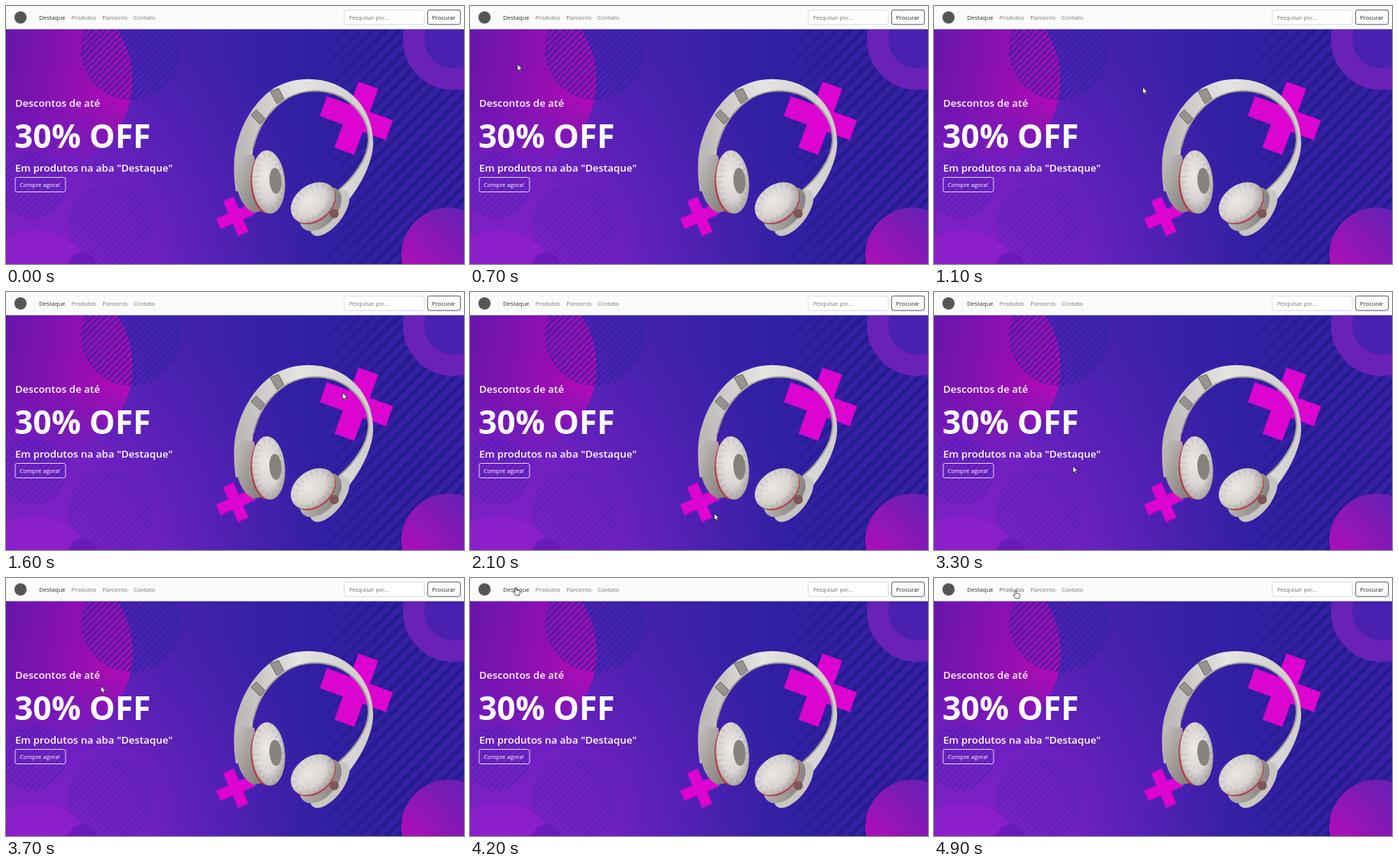
Write an HTML page that moves like this. It is 600 px wide and 338 px high and loops after 5000 ms.

```html
<!DOCTYPE html>
<html lang="pt">
<head>
<meta charset="utf-8">
<style>
html, body { margin: 0; width: 100%; height: 100%; overflow: hidden; }
svg { display: block; width: 100%; height: 100%; }
text { font-family: "Open Sans", "Noto Sans", sans-serif; font-size: 7.65px; }
.link { fill: #777; }
.link.on { fill: #2c2c2c; }
.head { font-weight: 600; font-size: 13.4px; }
</style>
</head>
<body>
<svg viewBox="0 0 600 338">
  <defs>
    <linearGradient id="bg">
      <stop offset="0" stop-color="#6a1fc0"/>
      <stop offset=".35" stop-color="#4321ae"/>
      <stop offset=".65" stop-color="#3120a3"/>
      <stop offset="1" stop-color="#3a1fa6"/>
    </linearGradient>
    <radialGradient id="glow" gradientUnits="userSpaceOnUse" cx="60" cy="350" r="370">
      <stop offset="0" stop-color="#8420c8"/>
      <stop offset=".35" stop-color="#7820c4" stop-opacity=".8"/>
      <stop offset="1" stop-color="#5a20b4" stop-opacity="0"/>
    </radialGradient>
    <linearGradient id="disc" x1=".25" y1=".4" x2="1" y2=".55">
      <stop offset="0" stop-color="#6416ac"/>
      <stop offset=".5" stop-color="#8a10b2"/>
      <stop offset="1" stop-color="#b60ab2"/>
    </linearGradient>
    <linearGradient id="discFade" x1="0" y1="0" x2="0" y2="1">
      <stop offset=".6" stop-color="#fff"/>
      <stop offset="1" stop-color="#000"/>
    </linearGradient>
    <mask id="fade"><circle cx="46" cy="97" r="120" fill="url(#discFade)"/></mask>
    <linearGradient id="corner" x1="0" y1=".75" x2=".65" y2=".15">
      <stop offset="0" stop-color="#b60cb8"/>
      <stop offset="1" stop-color="#6c1fb4"/>
    </linearGradient>
    <linearGradient id="band" x1="0" y1=".5" x2="1" y2=".4">
      <stop offset="0" stop-color="#b9b5b3"/>
      <stop offset=".5" stop-color="#e6e4e3"/>
      <stop offset="1" stop-color="#cfccca"/>
    </linearGradient>
    <radialGradient id="pad" cx=".45" cy=".4" r=".65">
      <stop offset="0" stop-color="#ebe8e6"/>
      <stop offset=".6" stop-color="#d8d4d2"/>
      <stop offset="1" stop-color="#a39e9d"/>
    </radialGradient>
    <linearGradient id="shell" x1="0" y1="0" x2="1" y2="1">
      <stop offset="0" stop-color="#c4c0be"/>
      <stop offset="1" stop-color="#7d7877"/>
    </linearGradient>
    <pattern id="fine" width="6" height="6" patternUnits="userSpaceOnUse" patternTransform="rotate(-45)">
      <rect width="6" height="2.8" fill="#2c22a2"/>
    </pattern>
    <pattern id="wide" width="12" height="12" patternUnits="userSpaceOnUse" patternTransform="rotate(-45)">
      <rect width="12" height="5.5" fill="#201c8a"/>
    </pattern>
    <linearGradient id="wideFade">
      <stop offset="0" stop-color="#000"/>
      <stop offset=".6" stop-color="#ddd"/>
    </linearGradient>
    <mask id="wideMask"><rect x="380" y="30" width="220" height="308" fill="url(#wideFade)"/></mask>
    <path id="cross" d="M-13.8-46h27.6v32.2h32.2v27.6h-32.2v32.2h-27.6v-32.2h-32.2v-27.6h32.2z" fill="#dc04d0"/>
  </defs>

  <rect width="600" height="338" fill="url(#bg)"/>
  <rect width="600" height="338" fill="url(#glow)"/>
  <circle cx="46" cy="97" r="120" fill="url(#disc)" mask="url(#fade)"/>
  <circle cx="163" cy="58" r="65" fill="url(#fine)" opacity=".75"/>
  <circle cx="35" cy="235" r="44" fill="url(#fine)" opacity=".35"/>
  <circle cx="137" cy="290" r="57" fill="url(#fine)" opacity=".25"/>
  <circle cx="38" cy="375" r="81" fill="#8f1fcc" opacity=".75"/>
  <circle cx="100" cy="342" r="19" fill="#651bb8" opacity=".8"/>
  <rect x="380" y="30" width="220" height="308" fill="url(#wide)" mask="url(#wideMask)"/>
  <circle cx="586" cy="44" r="52" fill="#4a20b0" stroke="#6a21b8" stroke-width="28"/>
  <circle cx="580" cy="326" r="62" fill="url(#corner)"/>
  <use href="#cross" transform="translate(459 147) rotate(20)"/>
  <use href="#cross" transform="translate(301 275.6) rotate(-23) scale(.54)"/>

  <!-- headphones -->
  <path fill="url(#band)" d="M301 243C297 215 298 190 305 172C315 140 335 118 352 107C375 94 405 92 430 102C462 115 481 145 481 180C481 205 462 242 440 264L424 270L436 241C455 225 474 200 475 176C476 148 455 124 430 115C405 107 380 112 362 125C342 140 330 160 324 185L318 240Z"/>
  <path fill="none" stroke="#a19c9b" stroke-width="2" d="M324 185C330 160 342 140 362 125C380 112 405 107 430 115C455 124 476 148 475 176C474 200 455 225 436 241"/>
  <path fill="#99938f" stroke="#6b6664" d="M346 112l11-4 7 13-9 7zM321 143l7-7 11 11-6 8z"/>
  <path fill="url(#shell)" d="M302 193C297 222 302 262 325 271L337 268L325 196Z"/>
  <ellipse cx="341.5" cy="231" rx="21" ry="41" fill="#b6404a" transform="rotate(-2 341.5 231)"/>
  <ellipse cx="344" cy="230.5" rx="21.5" ry="41.5" fill="url(#pad)" transform="rotate(-4 344 230.5)"/>
  <ellipse cx="353" cy="229" rx="8" ry="17" fill="#88827f" transform="rotate(-4 353 229)"/>
  <ellipse cx="424" cy="271" rx="36" ry="17" fill="#c9c5c3" transform="rotate(-52 424 271)"/>
  <ellipse cx="412" cy="266" rx="34" ry="21" fill="url(#shell)" transform="rotate(-48 412 266)"/>
  <ellipse cx="403.5" cy="259" rx="32" ry="23" fill="#b6404a" transform="rotate(-40 403.5 259)"/>
  <ellipse cx="402" cy="257.5" rx="32" ry="23" fill="url(#pad)" transform="rotate(-38 402 257.5)"/>
  <g fill="none" stroke="#8d8886" stroke-width="8" stroke-dasharray=".8 7" opacity=".45">
    <ellipse cx="344" cy="230.5" rx="17" ry="36" transform="rotate(-4 344 230.5)"/>
    <ellipse cx="402" cy="257.5" rx="27" ry="18" transform="rotate(-38 402 257.5)"/>
  </g>
  <circle cx="430" cy="272" r="6" fill="#7d5557"/>

  <g fill="#fff">
    <text class="head" x="12" y="132">Descontos de até</text>
    <text x="11" y="186" style="font-size:42.6px;font-weight:700">30% OFF</text>
    <text class="head" x="12" y="217">Em produtos na aba "Destaque"</text>
    <text x="18" y="237">Compre agora!</text>
  </g>
  <rect x="12" y="224.5" width="66" height="19" rx="2.5" fill="none" stroke="#fff" stroke-width=".8"/>

  <rect width="600" height="30" fill="#fafbfa"/>
  <rect y="30" width="600" height="1" fill="#8a86a0"/>
  <circle cx="19" cy="15" r="8" fill="#555"/>
  <text class="link on" x="43.5" y="17.8">Destaque</text>
  <text class="link" id="products" x="85.7" y="17.8">Produtos</text>
  <text class="link" x="126.3" y="17.8">Parceiros</text>
  <text class="link" x="167" y="17.8">Contato</text>
  <rect x="443" y="5.2" width="105" height="19" rx="2.5" fill="#fff" stroke="#ced2d6" stroke-width=".8"/>
  <text x="449.5" y="17.6" fill="#6c7177" style="font-size:7.2px">Pesquisar por...</text>
  <rect x="552.3" y="5.2" width="43" height="19" rx="2.5" fill="none" stroke="#333" stroke-width=".8"/>
  <text x="558" y="17.8" fill="#2c2c2c">Procurar</text>

  <g id="cursor" stroke="#111" stroke-width=".7" stroke-linejoin="round" fill="#fff">
    <path id="arrow" d="M0 0V8.8L2 7L3.4 10L4.8 9.3L3.4 6.5H6.1Z"/>
    <path id="hand" d="M-1 1Q0-.6 1 1V4L4.6 4.8Q5.8 5.2 5.6 6.6L4.6 10.5H-.4L-3 6.8Q-3.2 5.4-1 6.6Z"/>
  </g>
</svg>
<script>
const $ = id => document.getElementById(id);

// Pointer path: time, x, y
const path = [
  [0, 70, -16], [700, 62, 76], [1150, 300, 110], [1600, 441, 132],
  [1750, 400, 318], [2100, 320, 290], [2600, 253, 210], [3300, 182, 228],
  [3800, 110, 120], [4200, 60, 12], [4400, 62, 14], [4900, 107, 16], [5000, 107, 16]
];

function pointerAt(t) {
  const i = path.findIndex(p => p[0] > t);
  const [t0, x0, y0] = path[i - 1], [t1, x1, y1] = path[i];
  const k = (t - t0) / (t1 - t0);
  return [x0 + (x1 - x0) * k, y0 + (y1 - y0) * k];
}

function draw(now) {
  const t = Math.floor(now % 5000 / 100) * 100;
  const [x, y] = pointerAt(t);
  const overNav = y > 3 && y < 26 && x > 39 && x < 200;
  $("cursor").setAttribute("transform", `translate(${x} ${y})`);
  $("arrow").style.display = overNav ? "none" : "";
  $("hand").style.display = overNav ? "" : "none";
  $("products").style.fill = overNav && x > 82 && x < 122 ? "#555" : "";
  requestAnimationFrame(draw);
}
requestAnimationFrame(draw);
</script>
</body>
</html>
```
